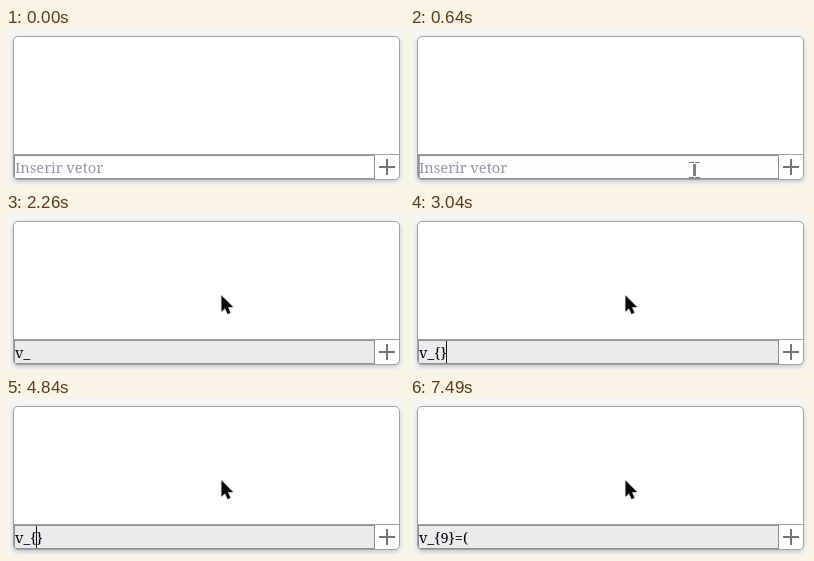
Recreate the animation shown at these times as an HTML page with a canvas. Size 398 by 157 pixels, loop 8000 ms.

```html
<!DOCTYPE html>
<html lang="pt">
<head>
<meta charset="utf-8">
<title>Inserir vetor</title>
<style>
  html, body { margin: 0; width: 100%; height: 100%; overflow: hidden; background: #f5f5f5; }
  canvas { display: block; width: 398px; height: 157px; }
</style>
</head>
<body>
<canvas id="stage" width="398" height="157"></canvas>
<script>
const ctx = document.getElementById('stage').getContext('2d');
const LOOP = 8000;
const FOCUS = 600;
const FIRST_BLINK = 1175;
const BLINK = 526;
const FONT = '14.6px "Noto Serif", serif';
const TEXT_X = 9;
const INPUT_TOP = 127;

const keys = [
  { time: 1490, key: 'v' }, { time: 1880, key: '_' },
  { time: 2890, key: '{' }, { time: 3040, key: '}' },
  { time: 3600, key: 'Left' }, { time: 5230, key: '9' },
  { time: 5920, key: 'Right' }, { time: 6400, key: '=' },
  { time: 7420, key: '(' }
];

const ramp = (t, from, to) => Math.min(1, Math.max(0, (t - from) / (to - from)));
const smooth = p => p * p * (3 - 2 * p);
const easeOut = p => 1 - (1 - p) ** 2;
const mix = (a, b, p) => a + (b - a) * p;

function rect(x, y, w, h, color) {
  ctx.fillStyle = color;
  ctx.fillRect(x, y, w, h);
}

function cardPath() {
  ctx.beginPath();
  ctx.roundRect(7.5, 8.5, 386, 143, 4.5);
}

function drawCard(shade) {
  ctx.save();
  ctx.shadowColor = 'rgba(0,0,0,.22)';
  ctx.shadowBlur = 5;
  ctx.shadowOffsetY = 2;
  ctx.fillStyle = '#fff';
  cardPath();
  ctx.fill();
  ctx.restore();

  ctx.save();
  cardPath();
  ctx.clip();
  rect(7, INPUT_TOP - 1, 387, 1, '#a0a0a4');
  rect(8, INPUT_TOP, 361, 24, '#909090');
  rect(9, INPUT_TOP + 1, 359, 22, `rgb(${shade},${shade},${shade})`);
  ctx.restore();

  cardPath();
  ctx.lineWidth = 1;
  ctx.strokeStyle = '#a0a0b0';
  ctx.stroke();

  rect(373, 138, 16, 2, '#757575');
  rect(380, 131, 2, 16, '#757575');
}

// Replays the keys pressed so far.
function editState(t) {
  let value = '', pos = 0, last = FOCUS;
  for (const { time, key } of keys) {
    if (time > t) break;
    last = time;
    if (key === 'Left') pos--;
    else if (key === 'Right') pos++;
    else {
      value = value.slice(0, pos) + key + value.slice(pos);
      pos++;
    }
  }
  return { value, pos, last };
}

const blinks = t => Math.max(0, Math.ceil((t - FIRST_BLINK) / BLINK));

function drawText(t, focus) {
  const { value, pos, last } = editState(t);
  ctx.font = FONT;
  ctx.fillStyle = value ? '#05050f' : '#9596a8';
  ctx.fillText(value || 'Inserir vetor', TEXT_X, 145);

  // A key shows the caret at once; the blink keeps its own beat.
  const visible = t >= FOCUS && (blinks(t) - blinks(last)) % 2 === 0;
  if (!visible) return;
  const x = TEXT_X + Math.floor(ctx.measureText(value.slice(0, pos)).width);
  rect(x, INPUT_TOP + 1, 1, 22, `rgba(17,17,17,${Math.sqrt(focus)})`);
}

function drawBeam(x, y) {
  rect(x - 1, y - 6, 3, 12, '#808084');
  for (const edge of [y - 8, y + 7]) {
    rect(x - 5, edge, 5, 1, '#77777c');
    rect(x + 1, edge, 5, 1, '#77777c');
  }
}

function drawArrow(x, y) {
  const points = [[.5, .5], [.5, 16.5], [4, 13.3], [6.6, 19], [9.4, 17.8], [6.9, 12.3], [12, 12]];
  ctx.beginPath();
  points.forEach(([px, py]) => ctx.lineTo(x + px, y + py));
  ctx.closePath();
  ctx.lineJoin = 'round';
  ctx.lineWidth = 1.4;
  ctx.strokeStyle = '#d4d4d4';
  ctx.stroke();
  ctx.fillStyle = '#0a0a0a';
  ctx.fill();
}

function drawPointer(t) {
  if (t < 150) return;
  const enter = easeOut(ramp(t, 150, 380));
  const leave = smooth(ramp(t, 640, 940));
  const x = Math.round(mix(mix(294, 284, enter), 215, leave));
  const y = Math.round(mix(mix(151, 142, enter), 82, leave));
  if (y > INPUT_TOP) drawBeam(x, y);
  else drawArrow(x, y);
}

function draw(t) {
  const focus = ramp(t, FOCUS, 940);
  rect(0, 0, 398, 157, '#f5f5f5');
  drawCard(Math.round(mix(255, 235, focus)));
  drawText(t, focus);
  drawPointer(t);
}

const start = performance.now();
function tick() {
  draw((performance.now() - start) % LOOP);
  requestAnimationFrame(tick);
}
tick();
</script>
</body>
</html>
```
